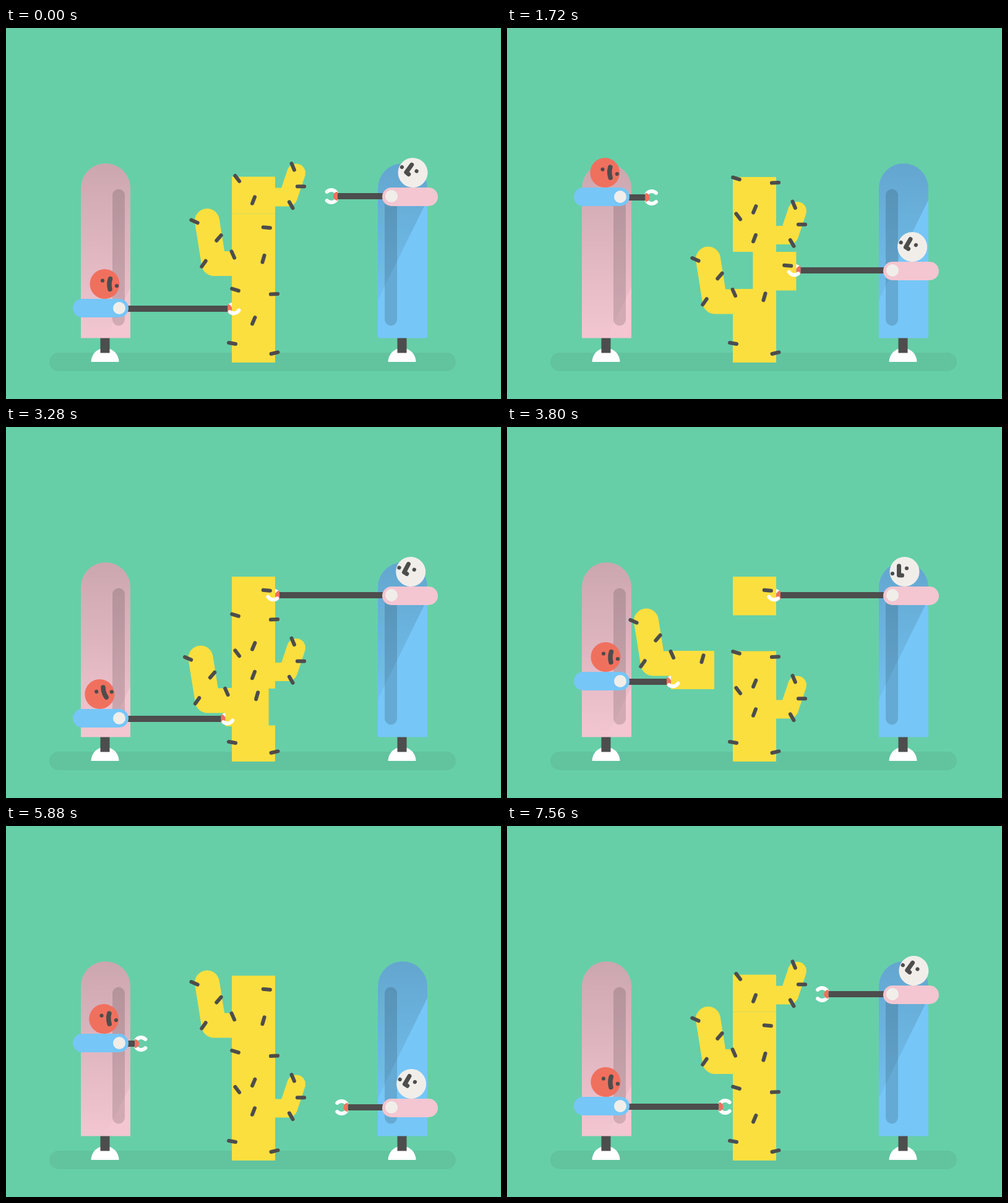
Recreate the animation shown at these times as an HTML page with a canvas. Size 800 px wide and 600 px high, loop 7600 ms.

```html
<!DOCTYPE html>
<html lang="en">
<head>
<meta charset="utf-8">
<title>Cactus robots</title>
<style>
html, body { margin: 0; width: 100%; height: 100%; overflow: hidden; background: #66cfa8; }
canvas { display: block; }
</style>
</head>
<body>
<canvas id="stage" width="800" height="600"></canvas>
<script>
const ctx = document.getElementById('stage').getContext('2d');
const LOOP = 7600, STEP = 40;
const DARK = '#4d4d4d', YELLOW = '#fbdf3f', PALE = '#f1eeea', RED = '#f0705e', PINK = '#f3c6d1', BLUE = '#76c6f7';

const robots = {
  left: {
    dir: 1, body: 121, slot: 172, leg: 160, sleeve: 108, joint: 183, wrist: 208,
    skin: PINK, cloth: BLUE, head: RED, shade: 420,
    sway: { mid: 152.4, size: 7.1, turns: 4, upright: 159.5 }
  },
  right: {
    dir: -1, body: 601, slot: 612, leg: 640, sleeve: 608, joint: 623, wrist: 592,
    skin: BLUE, cloth: PINK, head: PALE, shade: 278,
    sway: { mid: 650, size: 7.5, turns: 5, upright: 642.5 }
  }
};

// Each spine is x, y, angle in degrees
const pieces = {
  base: { top: 482.5, height: 58.5, spines: [[365.5, 510, 10], [434, 525.7, -13]] },
  plain: { top: 421, height: 61.5, spines: [[370.5, 423.3, 17], [433.5, 430.3, -3], [400.2, 473.3, -67]] },
  bigArm: {
    top: 360.5, height: 60.5, limb: [40, 370, 381, 336, 381, 325, 312],
    spines: [[304.5, 312.8, 24], [344, 339.5, -49], [366.8, 366.5, 66], [319.5, 381.3, -55], [416, 373.3, -74]]
  },
  block: { top: 300.5, height: 61, spines: [[421.3, 322.7, 5]] },
  smallArm: {
    top: 240.5, height: 58.5, limb: [30, 430, 273.5, 456, 273.5, 469, 234.5],
    spines: [[373.7, 243.3, 53], [400, 278.5, -69], [463.7, 224.3, 67], [476.5, 256.3, 0], [460.7, 286.3, 60]]
  }
};

// One job: at `grab` a hand takes a piece and pulls it out by `shift`, lifts it,
// puts it back on top `place` later and lets go at `free`.
const jobs = [
  { robot: robots.left, piece: 'plain', grab: 0, pick: 453, far: 150, shift: 150, place: 800, free: 1400 },
  { robot: robots.right, piece: 'block', grab: 1600, pick: 393, far: 150, shift: 150, place: 1200, free: 3000 },
  { robot: robots.left, piece: 'bigArm', grab: 3200, pick: 471, far: 150, shift: 100, place: 800, free: 1400 },
  { robot: robots.right, piece: 'smallArm', grab: 6000, pick: 456, far: 112, shift: 112, place: 800, free: 1400 }
];

// Work through the jobs once: what lies above a taken piece falls, one after another
function planFalls() {
  const stack = ['plain', 'bigArm', 'block', 'smallArm'];
  for (const name of stack) pieces[name].falls = [];
  for (const job of jobs) {
    const isHeld = name => jobs.some(o => o.piece === name && o.grab < job.grab && job.grab < o.grab + o.free);
    const above = stack.splice(stack.indexOf(job.piece)).slice(1);
    const loose = above.filter(name => !isHeld(name));
    loose.forEach((name, i) => pieces[name].falls.push([job.grab + 230 + 40 * i, pieces[job.piece].height]));
    job.rise = loose.reduce((sum, name) => sum + pieces[name].height, 0);
    stack.push(...loose, job.piece, ...above.filter(isHeld));
    pieces[job.piece].job = job;
  }
}

const smooth = p => p * p * (3 - 2 * p);

// Cubic bezier (.6, 0, .4, 1), solved by bisection
function strong(p) {
  let lo = 0, hi = 1;
  for (let i = 0; i < 24; i++) {
    const s = (lo + hi) / 2, r = 1 - s;
    if (1.8 * s * r * r + 1.2 * s * s * r + s * s * s < p) lo = s; else hi = s;
  }
  return smooth(lo);
}

// Keys are [start, end, value]; each one eases from the value before it
function track(t, keys, ease = smooth) {
  let value = 0;
  for (const [start, end, next] of keys) {
    if (t < start) break;
    value += (next - value) * ease(Math.min(1, (t - start) / (end - start)));
  }
  return value;
}

// Keys of all of a robot's jobs, with the loops before and after
function robotKeys(robot, keysOf) {
  return [-LOOP, 0, LOOP].flatMap(shift => jobs.filter(job => job.robot === robot).flatMap(job =>
    keysOf(job).map(([start, end, value]) => [job.grab + shift + start, job.grab + shift + end, value])));
}

function planRobot(robot) {
  robot.lift = robotKeys(robot, j => [[-800, -400, j.pick], [400, 800, j.pick - j.rise]]);
  robot.reach = robotKeys(robot, j => [[-200, 0, j.far], [0, 400, j.far - j.shift],
    [j.place, j.place + 400, j.far], [j.free, j.free + 400, 0]]);
  robot.grip = robotKeys(robot, j => [[-40, 0, 1], [j.free - 100, j.free, 0]]);
}

function poseOf(robot, t) {
  const { sway } = robot;
  const reach = track(t, robot.reach), grip = track(t, robot.grip);
  return {
    reach, grip,
    y: track(t, robot.lift, strong),
    wrist: robot.wrist + robot.dir * reach,
    head: sway.mid + sway.size * Math.cos(2 * Math.PI * sway.turns * t / LOOP)
  };
}

// Fall, then one small hop with a tilt
function placePiece({ job, falls }, t) {
  const at = { x: 0, y: 0, tilt: 0 };
  if (!job) return at;
  const age = t - job.grab;
  if (age >= 0 && age < job.free) at.x = job.robot.dir * (track(t, job.robot.reach) - job.far);
  at.y = track(age, [[400, 800, -job.rise]], strong);
  for (const [start, distance] of falls) {
    if (t < start) break;
    at.y += distance * Math.min(1, (t - start) / 160) ** 2;
    const hop = (t - start - 160) / 80;
    if (hop > 0 && hop < 1) {
      const k = 4 * hop * (1 - hop);
      at.y -= 2 * k;
      at.tilt = 0.016 * k;
    }
  }
  return at;
}

function fillRound(x, y, w, h, r, color) {
  ctx.fillStyle = color;
  ctx.beginPath();
  ctx.roundRect(x, y, w, h, r);
  ctx.fill();
}

function dot(x, y, r, color) {
  ctx.fillStyle = color;
  ctx.beginPath();
  ctx.arc(x, y, r, 0, 7);
  ctx.fill();
}

function line(points, width, color) {
  ctx.strokeStyle = color;
  ctx.lineWidth = width;
  ctx.lineCap = ctx.lineJoin = 'round';
  ctx.beginPath();
  for (let i = 0; i < points.length; i += 2) ctx.lineTo(points[i], points[i + 1]);
  ctx.stroke();
}

function drawBody(r) {
  ctx.fillStyle = '#fff';
  ctx.beginPath();
  ctx.arc(r.leg, 540, 22.5, Math.PI, 0);
  ctx.fill();
  ctx.fillStyle = DARK;
  ctx.fillRect(r.leg - 7.5, 500, 15, 25.5);

  ctx.save();
  ctx.beginPath();
  ctx.roundRect(r.body, 219, 80, 282.6, [40, 40, 0, 0]);
  ctx.clip();
  ctx.fillStyle = r.skin;
  ctx.fillRect(r.body, 219, 80, 283);
  const shade = ctx.createLinearGradient(0, 219, 0, 502);
  shade.addColorStop(0, 'rgba(0,0,0,.16)');
  shade.addColorStop(1, 'rgba(0,0,0,0)');
  ctx.fillStyle = shade;
  ctx.beginPath();
  ctx.moveTo(r.body, 219);
  ctx.lineTo(r.body + 80, 219);
  ctx.lineTo(r.body + 80, r.shade);
  ctx.lineTo(r.body, r.shade + 162);
  ctx.fill();
  ctx.restore();
  fillRound(r.slot, 260.5, 20, 221, 10, 'rgba(0,0,0,.14)');
}

function drawJaw(r, pose, side) {
  ctx.save();
  ctx.translate(pose.wrist, pose.y + r.dir);
  ctx.scale(r.dir, side);
  ctx.rotate(-0.26 * pose.grip);
  ctx.strokeStyle = '#fff';
  ctx.lineWidth = 6;
  ctx.lineCap = 'round';
  ctx.beginPath();
  ctx.arc(10.3, 0, 10, 0.8, 2.5);
  ctx.stroke();
  ctx.restore();
}

function drawRod(r, pose) {
  const y = pose.y + r.dir;
  drawJaw(r, pose, -1);
  if (!pose.grip) drawJaw(r, pose, 1);
  ctx.fillStyle = DARK;
  ctx.fillRect(Math.min(r.joint, pose.wrist), y - 5, Math.abs(pose.wrist - r.joint), 10);
  ctx.fillStyle = RED;
  ctx.beginPath();
  ctx.arc(pose.wrist, y, 7.2, -Math.PI / 2, Math.PI / 2, r.dir < 0);
  ctx.fill();
}

function drawFace(dir) {
  ctx.scale(dir, 1);
  dot(19.5, 3, 3.1, DARK);
  dot(-3.5, -5.5, 3.1, DARK);
  if (dir < 0) {
    line([9, -9.3, 9, 5.7, 4, 6], 7, DARK);
  } else {
    line([9, -8.5, 7.6, -3, 7.5, 3, 8.5, 8.5], 7.5, DARK);
  }
}

function drawUpper(r, pose) {
  fillRound(r.sleeve, pose.y - 15, 90, 30, 15, r.cloth);
  dot(r.joint, pose.y - (r.dir < 0 ? 1 : 0), 10, PALE);
  ctx.save();
  ctx.translate(pose.head, pose.y - 39);
  ctx.rotate((pose.head - r.sway.upright) / 24);
  dot(0, 0, 24, r.head);
  drawFace(r.dir);
  ctx.restore();
}

function drawSpine([x, y, degrees]) {
  const a = degrees * Math.PI / 180, dx = 5.6 * Math.cos(a), dy = 5.6 * Math.sin(a);
  line([x - dx, y - dy, x + dx, y + dy], 6, DARK);
}

function drawCactus(t) {
  const each = paint => {
    for (const piece of Object.values(pieces)) {
      const at = placePiece(piece, t);
      const cx = 400, cy = piece.top + piece.height / 2;
      ctx.save();
      ctx.translate(at.x + cx, at.y + cy);
      ctx.rotate(at.tilt);
      ctx.translate(-cx, -cy);
      paint(piece);
      ctx.restore();
    }
  };
  each(({ top, height, limb }) => {
    ctx.fillStyle = YELLOW;
    // A small overlap hides the seams
    ctx.fillRect(365, top, 70, height + (top + height < 500 ? 1.5 : 0));
    if (limb) line(limb.slice(1), limb[0], YELLOW);
  });
  each(piece => piece.spines.forEach(drawSpine));
}

function draw(t) {
  const crew = Object.values(robots).map(r => [r, poseOf(r, t)]);
  ctx.fillStyle = '#66cfa8';
  ctx.fillRect(0, 0, 800, 600);
  fillRound(70, 525, 657, 30, 15, '#62c39f');
  for (const [r, pose] of crew) {
    drawBody(r);
    drawRod(r, pose);
  }
  drawCactus(t);
  for (const [r, pose] of crew) {
    if (pose.grip) drawJaw(r, pose, 1);
    drawUpper(r, pose);
  }
}

planFalls();
Object.values(robots).forEach(planRobot);

const began = performance.now();
function tick() {
  const t = (performance.now() - began) % LOOP;
  draw(Math.floor(t / STEP) * STEP);
  requestAnimationFrame(tick);
}
tick();
</script>
</body>
</html>
```
